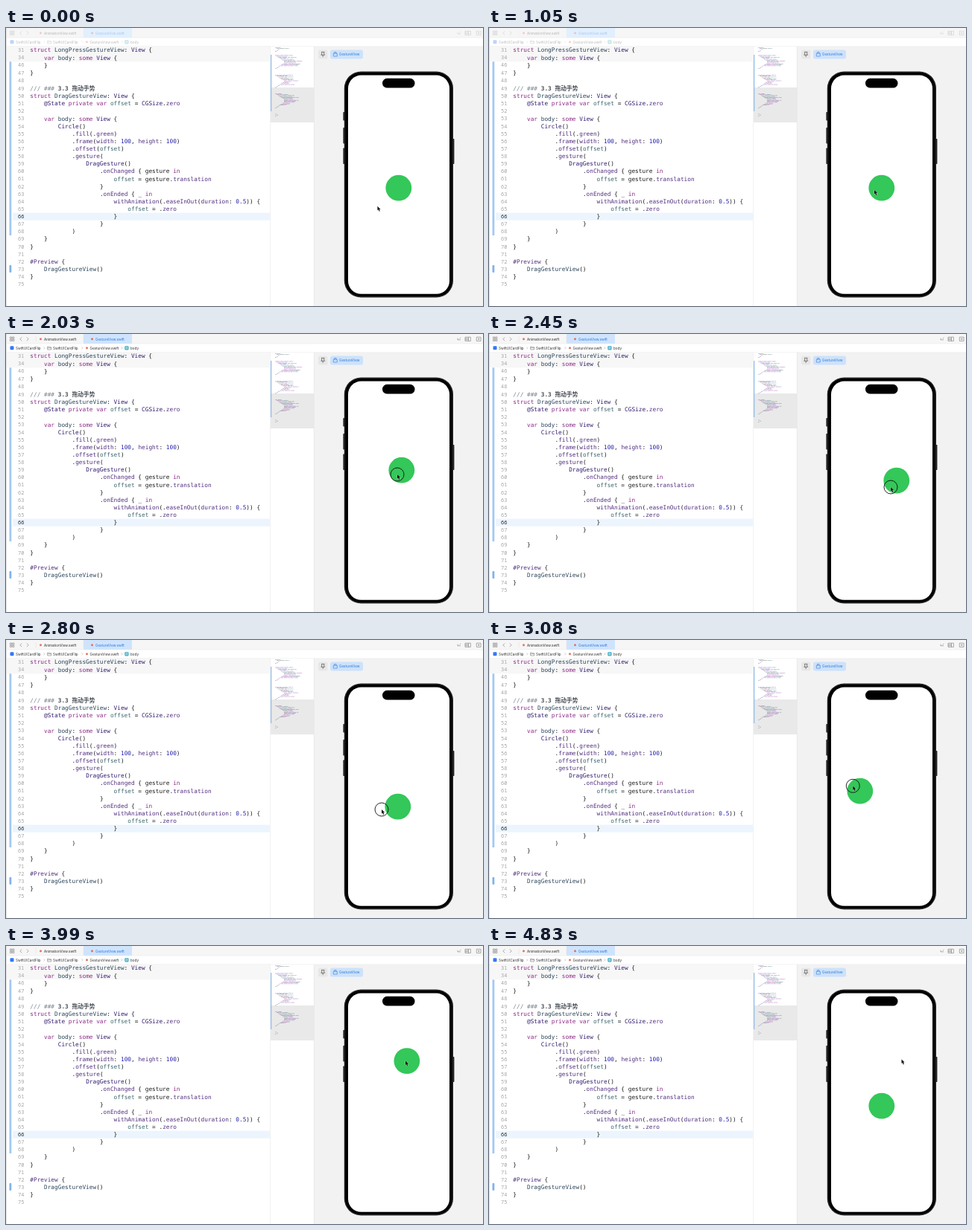
Animation, 640 px wide and 374 px high, one loop 4.9 s. Source, as an HTML page:

```html
<!DOCTYPE html>
<html lang="en">
<head>
<meta charset="utf-8">
<title>Drag gesture</title>
<style>
html, body { margin: 0; width: 100%; height: 100%; overflow: hidden; background: #fff; }
svg { display: block; width: 100vw; height: 100vh; }
text { font: 4.6px Inter, sans-serif; fill: #333; }
.code text { font: 7.77px "DejaVu Sans Mono", "Noto Sans CJK SC", "Noto Sans CJK", monospace; fill: #1c1c1c; }
.code .num { font: 7px "Noto Sans Mono", monospace; fill: #a4a4a4; text-anchor: end; }
.code .now { fill: #222; }
.key { fill: #8c2a86; }
.type { fill: #331c6e; }
.decl { fill: #2a4459; }
.call { fill: #52307f; }
.own { fill: #3d666c; }
.lit { fill: #2620ac; }
.note { fill: #7b858f; }
.head { fill: #4a5056; font-weight: 700; }
.icon { fill: none; stroke: #777; stroke-width: .6; }
.blue { fill: #2f78d8; }
</style>
</head>
<body>
<svg id="stage" viewBox="0 0 640 374" preserveAspectRatio="none">
  <rect width="640" height="374" fill="#fff"/>

  <!-- editor -->
  <rect y="25" width="354" height="20.3" fill="#f7f7f7"/>
  <rect x="9" y="248.6" width="345" height="10" fill="#ecf5fe"/>
  <rect x="4.5" y="45.3" width="2.8" height="233.7" fill="#a2c9f3"/>
  <rect x="4.5" y="319" width="2.8" height="10" rx="1" fill="#7fb3ee"/>
  <g class="code" id="code"></g>

  <!-- minimap -->
  <rect x="355" y="80" width="58" height="47" fill="#e9e9e9"/>
  <rect x="355" y="36" width="1.3" height="76" fill="#8fb9ea"/>
  <path d="M354.7 25V374" stroke="#e6e6e6" stroke-width=".6"/>
  <g id="map" opacity=".42"></g>

  <!-- preview -->
  <rect x="413" y="25" width="227" height="349" fill="#f2f2f2"/>
  <path d="M413.3 25V374" stroke="#e2e2e2" stroke-width=".6"/>
  <rect x="419" y="29.5" width="12.5" height="12" rx="2.5" fill="#e7e7e7"/>
  <path class="icon" d="M423 32.3H427.4M423.7 32.5V35L422.8 36.3H427.6L426.7 35V32.5M425.2 36.3V39" style="stroke:#333"/>
  <rect x="435" y="29.5" width="44" height="12" rx="2.5" fill="#cce2fb"/>
  <path class="icon" d="M439.3 34.3H444.3V38H439.3ZM440.5 34.3V32.5H443V34.3" style="stroke:#2f78d8"/>
  <text class="blue" x="447" y="37.2" font-size="4.5">GestureView</text>

  <g fill="#222">
    <rect x="452.4" y="113" width="4" height="11.5" rx=".8"/>
    <rect x="452.4" y="134" width="4" height="21.5" rx=".8"/>
    <rect x="452.4" y="161.5" width="4" height="21.5" rx=".8"/>
    <rect x="597.4" y="149" width="4" height="34" rx=".8"/>
  </g>
  <rect x="453.8" y="58.5" width="146.2" height="304" rx="22.5" fill="#1c1c1e"/>
  <rect x="454.8" y="59.5" width="144.2" height="302" rx="21.5" fill="#000" stroke="#48484a" stroke-width=".4"/>
  <rect x="459" y="63.6" width="136" height="294.2" rx="17.5" fill="#fff"/>
  <rect x="505" y="67.8" width="43.5" height="12.7" rx="6.3" fill="#000"/>

  <!-- window header -->
  <rect width="640" height="13" fill="#f6f6f6"/>
  <rect x="104" width="65" height="13" id="tab"/>
  <rect y="13" width="640" height="12" fill="#fff"/>
  <path d="M0 13H640M0 24.7H640" stroke="#e6e6e6" stroke-width=".5"/>
  <g id="bar">
    <path class="icon" d="M5.5 4H7.7V6.2H5.5ZM8.7 4H10.9V6.2H8.7ZM5.5 7.2H7.7V9.4H5.5ZM8.7 7.2H10.9V9.4H8.7ZM21.2 4.4L18.8 6.8 21.2 9.2M27.8 4.4L30.2 6.8 27.8 9.2"/>
    <path d="M40 3V10.5M104 3V10.5" stroke="#dcdcdc" stroke-width=".5"/>
    <circle cx="46.5" cy="6.8" r="1.5" fill="#e8705c"/>
    <text x="51" y="8.5">AnimationView.swift</text>
    <circle cx="115.5" cy="6.8" r="1.5" fill="#e8705c"/>
    <text class="blue" x="120" y="8.5">GestureView.swift</text>
    <path class="icon" d="M606 7.8H610M608.7 6.4L610.3 4.8M606 5.6V7.8M616 4.2H623.4V9.4H616ZM616 6H620.5M616 7.7H620.5M620.5 4.2V9.4M631.3 4.2H637V9.4H631.3ZM634.2 5.6V8M633 6.8H635.4"/>
    <rect x="5.5" y="16.3" width="5" height="5" rx="1.1" fill="#3478f6"/>
    <text x="13" y="20.6">SwiftUICardFlip</text>
    <path class="icon" d="M55.7 17H57.6L58.3 17.8H60.7V21H55.7ZM55.7 18.7H60.7"/>
    <text x="63" y="20.6">SwiftUICardFlip</text>
    <circle cx="108.5" cy="18.8" r="1.5" fill="#e8705c"/>
    <text x="112.5" y="20.6">GestureView.swift</text>
    <path class="icon" d="M50.5 17.2L52 18.8 50.5 20.4M101.5 17.2L103 18.8 101.5 20.4M154.5 17.2L156 18.8 154.5 20.4" style="stroke:#aaa"/>
    <rect x="159.3" y="16.2" width="5.2" height="5.2" rx="1.1" fill="#35a8c4"/>
    <path d="M160.8 17.7H163V19.9H160.8Z" fill="none" stroke="#fff" stroke-width=".6"/>
    <text x="167" y="20.6">body</text>
  </g>
  <path d="M.5 0V374" stroke="#e2e2e2"/>

  <!-- moving parts -->
  <circle id="ball" r="17.4" fill="#34c759"/>
  <g id="pointer">
    <circle id="ring" r="9" fill="none" stroke="#111" stroke-width=".9"/>
    <path d="M0 0V5.6L1.3 4.5 2.3 6.9 3.4 6.4 2.4 4.1H4.1Z" fill="#111" stroke="#fff" stroke-width=".5" paint-order="stroke"/>
  </g>
</svg>
<script>
const $ = id => document.getElementById(id);
const NS = 'http://www.w3.org/2000/svg';
const add = (parent, tag, attrs, text = '') => {
  const el = parent.appendChild(document.createElementNS(NS, tag));
  for (const k in attrs) el.setAttribute(k, attrs[k]);
  el.textContent = text;
  return el;
};

// Code listing
const CHAR = 4.68, LEFT = 32.3;
const sticky = { 31: 'struct LongPressGestureView: View {', 34: '    var body: some View {' };
const source = `    }
}

/// ### 3.3 拖动手势
struct DragGestureView: View {
    @State private var offset = CGSize.zero

    var body: some View {
        Circle()
            .fill(.green)
            .frame(width: 100, height: 100)
            .offset(offset)
            .gesture(
                DragGesture()
                    .onChanged { gesture in
                        offset = gesture.translation
                    }
                    .onEnded { _ in
                        withAnimation(.easeInOut(duration: 0.5)) {
                            offset = .zero
                        }
                    }
            )
    }
}

#Preview {
    DragGestureView()
}
`.split('\n');

const kinds = [
  ['note', /^\/\/\/ ### /],
  ['head', /^3\.3 .+/],
  ['key', /^(struct|var|some|private|in)\b/],
  ['decl', /^(LongPressGestureView|DragGestureView|body)\b/],
  ['type', /^(@State|View|CGSize|Circle|DragGesture)\b/],
  ['call', /^(\.[a-z]\w*|withAnimation|width|height|duration|#Preview)/],
  ['own', /^offset\b/],
  ['lit', /^\d+(\.\d+)?/],
  ['', /^(\w+|\s+|.)/]
];

function addLine(n, line, mid) {
  add($('code'), 'text', { class: n === 66 ? 'num now' : 'num', x: 24.5, y: mid + 2.4 }, n);
  let rest = line.trimStart();
  if (!rest) return;
  const row = add($('code'), 'text', { x: LEFT + (line.length - rest.length) * CHAR, y: mid + 2.5 });
  while (rest) {
    const [name, rule] = kinds.find(k => k[1].test(rest));
    const word = rest.match(rule)[0];
    if (name === 'call' && word[0] === '.') {
      add(row, 'tspan', {}, '.');
      add(row, 'tspan', { class: name }, word.slice(1));
    } else add(row, 'tspan', { class: name }, word);
    rest = rest.slice(word.length);
  }
}
addLine(31, sticky[31], 29.8);
addLine(34, sticky[34], 40);
source.forEach((line, i) => {
  const n = 46 + i;
  addLine(n, line, n < 49 ? 50 + i * 10.1 : n === 49 ? 81.4 : 91.7 + (n - 50) * 10.12);
});

// Minimap: blocks of [top, rows]
let seed = 7;
const rand = () => (seed = seed * 16807 % 2147483647) / 2147483647;
const inks = ['#9b2393', '#5a4bb0', '#444', '#326d74', '#6c36a9'];
[[26, 5], [36.5, 15], [63, 14], [88, 16], [115.5, 3]].forEach(([top, rows]) => {
  for (let r = 0; r < rows; r++) {
    const depth = Math.min(r, rows - 1 - r, 6);
    let x = 361 + depth * 2;
    const end = x + (r > rows - 4 ? 2 : 8 + rand() * 18);
    while (x < end) {
      const w = Math.min(1.5 + rand() * 6, end - x);
      add($('map'), 'rect', { x, y: top + r * 1.27, width: w, height: .75, fill: inks[rand() * inks.length | 0] });
      x += w + .7;
    }
  }
});

// Pointer path: time, x, y
const path = [
  [0, 498.4, 239.8], [420, 504, 235], [770, 517, 218], [1120, 517, 218],
  [1260, 527, 243], [1400, 534, 270], [1470, 532, 277], [1610, 514, 283],
  [1750, 499, 258], [1890, 509, 207], [1960, 521, 186], [2030, 525, 189],
  [2240, 534, 191], [2450, 539, 206], [2520, 545, 216], [2640, 536, 227],
  [2730, 516, 227], [2800, 504, 228], [3010, 488, 206], [3220, 496, 177],
  [3500, 526, 156], [3570, 526, 156], [3780, 529, 153], [3920, 530, 155],
  [4200, 553.5, 152.5], [4900, 553.5, 152.5]
];
const LOOP = 4900, STEP = 70, PRESS = 1120, RELEASE = 3920, BACK = 500;
const HOME = [526.8, 215.2], GRIP = [9.8, -2.8];

function slope(i, k) {
  const a = path[i - 1], b = path[i], c = path[i + 1];
  if (!a || !c || a[k] === b[k] || b[k] === c[k]) return 0;
  return (c[k] - a[k]) / (c[0] - a[0]);
}
function pointerAt(t) {
  const i = Math.max(0, path.findIndex(p => p[0] > t) - 1);
  const a = path[i], b = path[i + 1], d = b[0] - a[0], u = (t - a[0]) / d;
  const s = u * u * (3 - 2 * u);
  return [1, 2].map(k => a[k] + (b[k] - a[k]) * s
    + d * u * (1 - u) * ((1 - u) * slope(i, k) - u * slope(i + 1, k)));
}
// The ball trails the pointer by one step, then eases home.
function ballAt(t) {
  if (t <= PRESS || t >= RELEASE + BACK) return HOME;
  const held = pointerAt(Math.min(t, RELEASE) - STEP).map((v, k) => v + GRIP[k]);
  if (t <= RELEASE) return held;
  const u = (t - RELEASE) / BACK, s = u * u * (3 - 2 * u);
  return held.map((v, k) => v + (HOME[k] - v) * s);
}

function draw(now) {
  const t = Math.floor(now % LOOP / STEP) * STEP;
  const active = t >= PRESS;
  $('pointer').setAttribute('transform', `translate(${pointerAt(t)})`);
  $('ball').setAttribute('transform', `translate(${ballAt(t)})`);
  $('ring').setAttribute('opacity', active && t < RELEASE ? 1 : 0);
  $('bar').setAttribute('opacity', active ? 1 : .32);
  $('tab').setAttribute('fill', active ? '#cfe4fc' : '#e2effd');
}
const start = performance.now();
function tick() {
  draw(performance.now() - start);
  requestAnimationFrame(tick);
}
tick();
</script>
</body>
</html>
```
